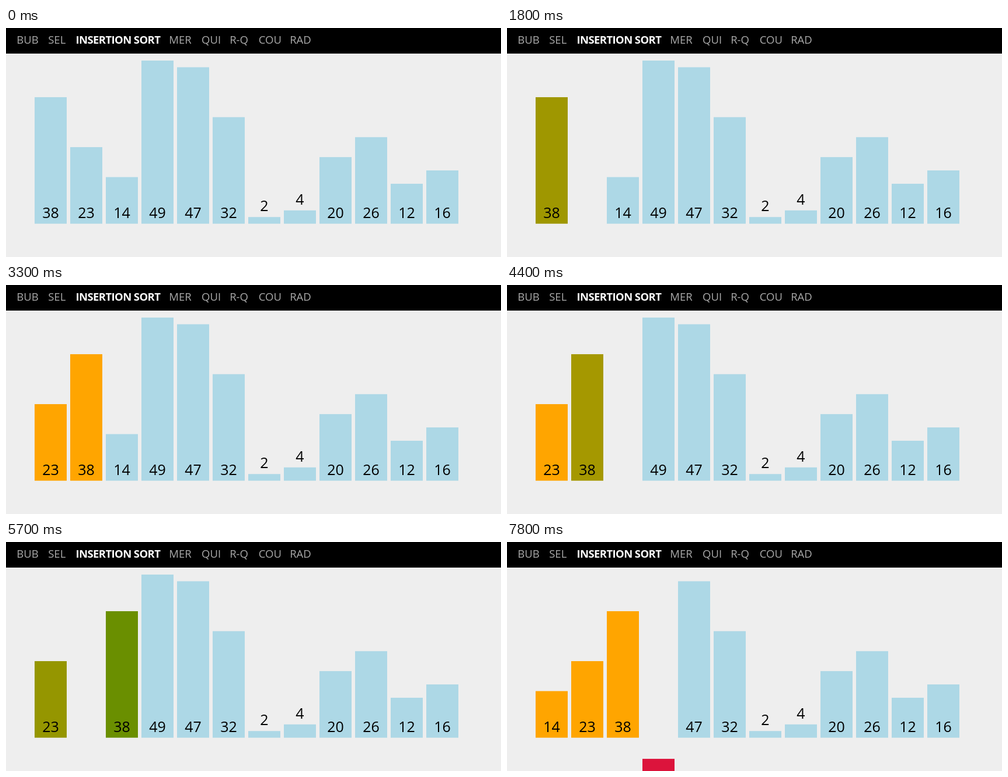
Recreate the animation shown at these times as an HTML page. Size 848 by 394 pixels, loop 8 s.

```html
<!DOCTYPE html>
<html lang="en">
<head>
<meta charset="utf-8">
<title>Insertion sort</title>
<style>
  html, body { margin: 0; width: 100%; height: 100%; overflow: hidden; background: #eee; }
  svg { display: block; width: 848px; height: 394px; font-family: "Open Sans", "Noto Sans", sans-serif; }
  .num { font-size: 25px; text-anchor: middle; }
  .menu { font-size: 18.5px; fill: #aaa; }
  .menu .on { fill: #fff; font-weight: 700; letter-spacing: -.6px; }
</style>
</head>
<body>
<svg viewBox="0 0 848 394">
  <g id="bars"></g>
  <rect width="848" height="44" />
  <g class="menu">
    <text x="18.2" y="27">BUB</text>
    <text x="72.2" y="27">SEL</text>
    <text x="119.5" y="27" class="on">INSERTION SORT</text>
    <text x="279.2" y="27">MER</text>
    <text x="335" y="27">QUI</text>
    <text x="383.2" y="27">R-Q</text>
    <text x="432.8" y="27">COU</text>
    <text x="486.2" y="27">RAD</text>
  </g>
</svg>
<script>
const LOOP = 8000, TICK = 100, MOVE = 200;
const LEFT = 49, PITCH = 61, WIDTH = 55, BASE = 336.7, UNIT = 63 / 11, DROP = 317;
const BLUE = [173, 216, 230], ORANGE = [255, 165, 0], GREEN = [0, 128, 0], RED = [220, 20, 60];
const values = [38, 23, 14, 49, 47, 32, 2, 4, 20, 26, 12, 16];

// [start, bar value, new state]
const steps = [
  [420, 38, { fill: ORANGE }],
  [1073, 23, { fill: RED, drop: 1 }],
  [1709, 38, { fill: GREEN }],
  [2355, 38, { col: 1 }],
  [2355, 23, { col: 0 }],
  [3020, 38, { fill: ORANGE }],
  [3020, 23, { fill: ORANGE, drop: 0 }],
  [3649, 14, { fill: RED, drop: 1 }],
  [4311, 38, { fill: GREEN }],
  [4958, 38, { col: 2 }],
  [4958, 14, { col: 1 }],
  [5606, 38, { fill: ORANGE }],
  [5606, 23, { fill: GREEN }],
  [6254, 23, { col: 1 }],
  [6254, 14, { col: 0 }],
  [6906, 23, { fill: ORANGE }],
  [6906, 14, { fill: ORANGE, drop: 0 }],
  [7550, 49, { fill: RED, drop: 1 }]
];

const ease = u => u < .5 ? 4 * u ** 3 : 1 - 4 * (1 - u) ** 3;
const mix = (a, b, p) => Array.isArray(a) ? a.map((v, i) => mix(v, b[i], p)) : a + (b - a) * p;

function add(parent, tag, attrs) {
  const el = document.createElementNS("http://www.w3.org/2000/svg", tag);
  for (const k in attrs) el.setAttribute(k, attrs[k]);
  return parent.appendChild(el);
}

const root = document.getElementById("bars");
const bars = values.map((value, col) => {
  const height = value * UNIT, top = BASE - height;
  const g = add(root, "g", {});
  const rect = add(g, "rect", { y: top, width: WIDTH, height });
  const baseline = height < 30 ? top - 10 : BASE - 9.7;
  add(g, "text", { class: "num", x: WIDTH / 2, y: baseline }).textContent = value;
  return { value, col, g, rect, steps: steps.filter(s => s[1] === value) };
});

function draw(time) {
  for (const bar of bars) {
    const state = { fill: BLUE, col: bar.col, drop: 0 };
    for (const [start, , next] of bar.steps) {
      const p = ease(Math.min(1, Math.max(0, (time - start) / MOVE)));
      for (const k in next) state[k] = mix(state[k], next[k], p);
    }
    bar.g.setAttribute("transform", `translate(${LEFT + PITCH * state.col} ${DROP * state.drop})`);
    bar.rect.setAttribute("fill", `rgb(${state.fill.map(Math.round)})`);
  }
}

// The picture advances ten times a second
function frame(now) {
  draw(Math.floor((now % LOOP) / TICK + .01) * TICK);
  requestAnimationFrame(frame);
}
draw(0);
requestAnimationFrame(frame);
</script>
</body>
</html>
```
